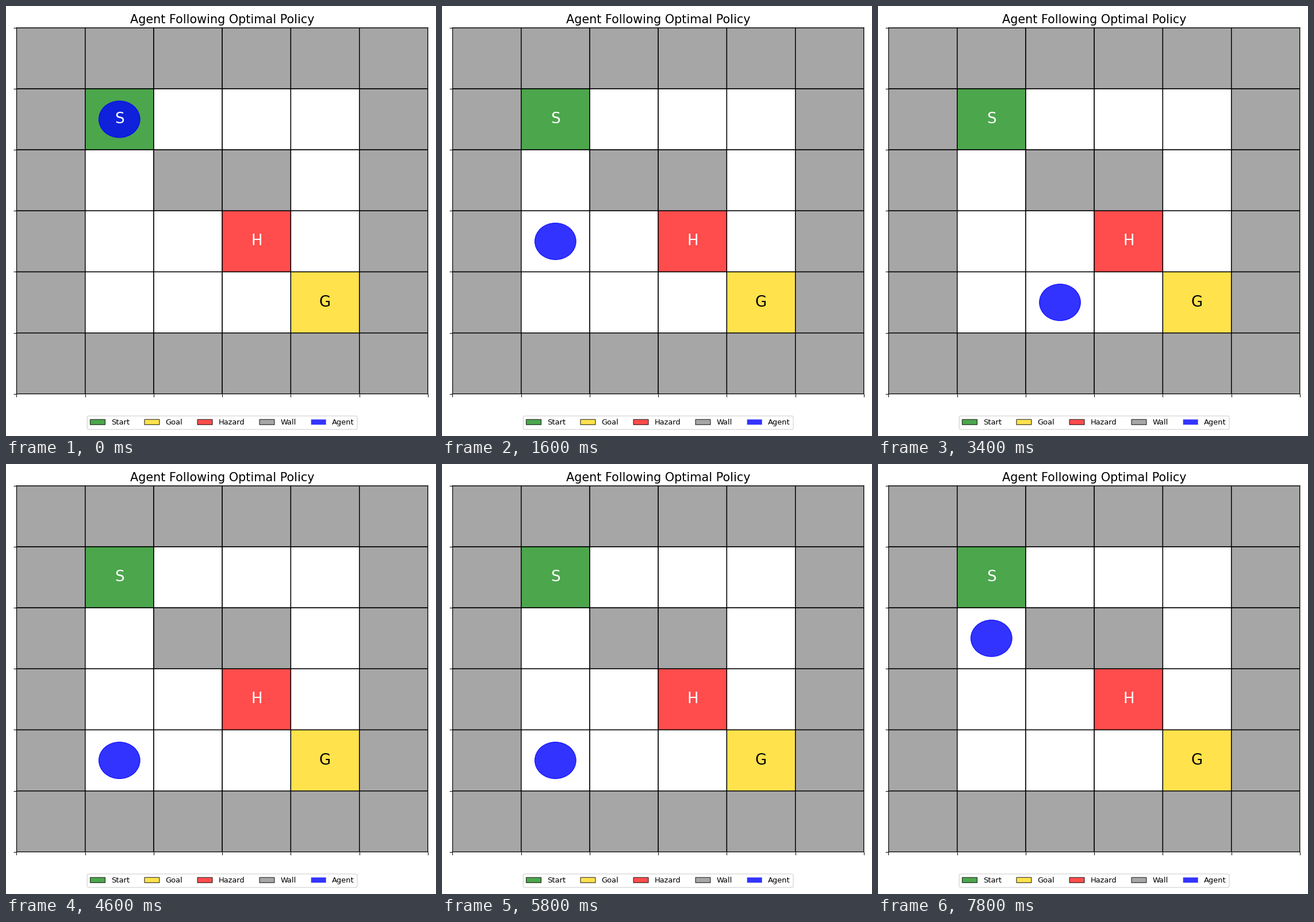
A matplotlib script for the animation above (8 s loop, 748 by 748 pixels).

```python
import matplotlib.pyplot as plt
from matplotlib.animation import FuncAnimation
from matplotlib.patches import Circle, Patch, Rectangle

SIZE = 748
DPI = 93.5
FRAMES, INTERVAL = 40, 200

MAZE = ["######",
        "#S   #",
        "# ## #",
        "#  H #",
        "#   G#",
        "######"]
COLORS = {"S": "green", "G": "gold", "H": "red", "#": "gray", " ": "white"}
NAMES = {"S": "Start", "G": "Goal", "H": "Hazard", "#": "Wall"}

# Cells (column, row) the policy visits, from start to goal.
ROUTE = [(1, 1), (1, 2), (1, 3), (1, 4), (2, 4), (3, 4), (4, 4)]
# Steps on which the agent slips into a wall and does not advance.
SLIPS = {11, 20}


def walk(count):
    """Agent cell for every step; after the goal a new run begins at the start."""
    cells, pos = [ROUTE[0]], 0
    for step in range(1, count):
        if pos == len(ROUTE) - 1:
            pos = 0
        if step not in SLIPS:
            pos += 1
        cells.append(ROUTE[pos])
    return cells


def center(cell):
    return cell[0] + 0.5, cell[1] + 0.5


def cell_style(kind):
    return dict(facecolor=COLORS[kind], edgecolor="black", alpha=0.7)


fig = plt.figure(figsize=(SIZE / DPI, SIZE / DPI), dpi=DPI)
left, right, top, bottom = 18.4, 733.9, 37.8, 674.8
ax = fig.add_axes([left / SIZE, 1 - bottom / SIZE,
                   (right - left) / SIZE, (bottom - top) / SIZE])
n = len(MAZE)
ax.set_xlim(0, n)
ax.set_ylim(n, 0)
ax.set_xticks(range(n + 1), labels=[])
ax.set_yticks(range(n + 1), labels=[])
ax.grid(True, color="black", linewidth=1)
ax.set_title("Agent Following Optimal Policy", fontsize=16)

for r, row in enumerate(MAZE):
    for c, kind in enumerate(row):
        ax.add_patch(Rectangle((c, r), 1, 1, **cell_style(kind)))
        if kind in "SGH":
            ax.text(*center((c, r)), kind, fontsize=20, ha="center", va="center",
                    color="black" if kind == "G" else "white")

agent = ax.add_patch(Circle(center(ROUTE[0]), 0.3, color="blue", alpha=0.8))

handles = [Patch(label=name, **cell_style(kind)) for kind, name in NAMES.items()]
handles.append(Patch(facecolor="blue", alpha=0.8, label="Agent"))
ax.legend(handles=handles, loc="upper center", bbox_to_anchor=(0.5, -0.05),
          ncol=len(handles))

# Keep lines at their true sub-pixel positions.
for artist in fig.findobj():
    artist.set_snap(False)

path = walk(FRAMES)


def update(frame):
    agent.set_center(center(path[frame]))
    return [agent]


anim = FuncAnimation(fig, update, frames=FRAMES, interval=INTERVAL,
                     repeat=True, repeat_delay=0, blit=False)
plt.show()
```
